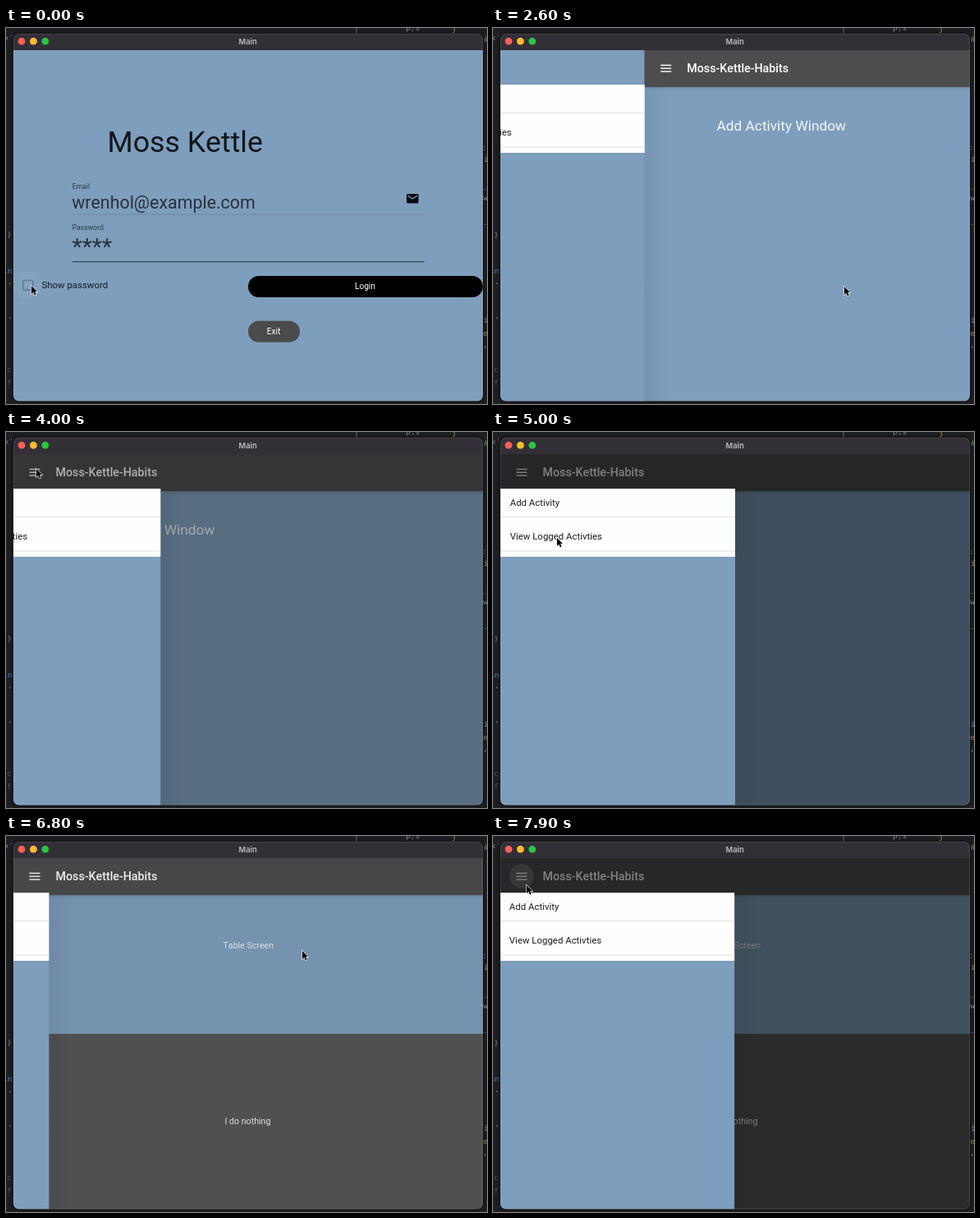
An HTML page with a canvas for the animation above (8 s loop, 586 by 458 pixels).

```html
<!DOCTYPE html>
<html lang="en">
<head>
<meta charset="utf-8">
<title>Main</title>
<style>
html, body { margin: 0; width: 100%; height: 100%; overflow: hidden; background: #1f2023; }
canvas { display: block; }
</style>
</head>
<body>
<canvas id="stage" width="586" height="458"></canvas>
<script>
const ctx = document.getElementById('stage').getContext('2d');
ctx.fontKerning = 'none';
const LOOP = 8000, LEFT = 9, TOP = 27, W = 572, BOTTOM = 454.5, DRAWER = 286;
const BLUE = '#7e9ebd', GREY = '#4d4d4d';
const SANS = 'Roboto, sans-serif', MONO = '"DejaVu Sans Mono", monospace';

const clamp = v => Math.min(1, Math.max(0, v));
const span = (t, from, length) => clamp((t - from) / length);
const outQuad = p => 1 - (1 - p) ** 2;
const outCubic = p => 1 - (1 - p) ** 3;
const inOut = p => p * p * (3 - 2 * p);

function rect(x, y, w, h, color) {
  ctx.fillStyle = color;
  ctx.fillRect(x, y, w, h);
}

function round(x, y, w, h, r) {
  ctx.beginPath();
  ctx.roundRect(x, y, w, h, r);
}

function pill(x, y, w, h, color) {
  round(x, y, w, h, h / 2);
  ctx.fillStyle = color;
  ctx.fill();
}

function disc(x, y, r, color) {
  ctx.beginPath();
  ctx.arc(x, y, Math.max(0, r), 0, 7);
  ctx.fillStyle = color;
  ctx.fill();
}

function text(s, x, y, size, color, weight = 400, family = SANS) {
  ctx.font = `${weight} ${size}px ${family}`;
  ctx.fillStyle = color;
  ctx.fillText(s, x, y);
}

function fade(x0, y0, x1, y1, alpha) {
  const g = ctx.createLinearGradient(x0, y0, x1, y1);
  g.addColorStop(0, `rgba(0,0,0,${alpha})`);
  g.addColorStop(1, 'rgba(0,0,0,0)');
  return g;
}

function clipped(x, y, w, h, r, paint) {
  ctx.save();
  round(x, y, w, h, r);
  ctx.clip();
  paint();
  ctx.restore();
}

function shifted(dx, paint) {
  ctx.save();
  ctx.translate(dx, 0);
  paint();
  ctx.restore();
}

// Slivers of a code editor showing around the window: text, x, y, colour
const slivers = [
  ["ox'", -8, 15, '#777b80'], [')', 1, 255, '#8b8f96'], ['in', -4, 299, '#4f8fd0'],
  ["'", 2, 317, '#a6a6a0'], ["'", 2, 359, '#a6a6a0'], ['c', 1, 419, '#55585c'],
  ['f', 1, 435, '#55585c'], ['#', 582, 17, '#5f8f4e'], [':', 580, 149, '#8aa04a'],
  ['i', 582, 163, '#c09a50'], ['_s', 580, 195, '#a9a95a'], ['w', 581, 210, '#9aa0a6'],
  ['-', 581, 242, '#6a8f4e'], ['i', 582, 359, '#9aa0a6'], ['e', 581, 375, '#c08a50'],
  [',', 581, 389, '#9aa0a6'], ['p,s', 487, 3, '#85898f'], ['j', 543, 4, '#c0a84a']
];

function desktop() {
  rect(0, 0, 586, 458, '#1f2023');
  rect(426, 0, 2, 7, '#4a4b4f');
  for (const [s, x, y, color] of slivers) text(s, x, y, 9.5, color, 400, MONO);
}

function login(t) {
  rect(LEFT, TOP, W, 428, BLUE);
  text('Moss Kettle', 123.5, 151, 35.7, '#11161b');
  text('Email', 80.7, 196, 8.6, '#2c3844');
  text('wrenhol@example.com', 80.2, 220, 21.4, '#28323c');
  rect(81, 226.5, 428, 1, '#6d89a5');
  text('Password', 80.7, 246, 8.6, '#2c3844');
  text('****', 80.5, 276, 28.3, '#28323c');
  rect(81, 284, 428.5, 1.3, '#2f4f5a');

  round(488, 202, 14.5, 11.5, 1.5);
  ctx.fillStyle = '#080a0c';
  ctx.fill();
  ctx.beginPath();
  ctx.moveTo(489.5, 204.2);
  ctx.lineTo(495.2, 208);
  ctx.lineTo(501, 204.2);
  ctx.strokeStyle = BLUE;
  ctx.lineWidth = 1.3;
  ctx.stroke();

  disc(26.5, 313.5, 17, `rgba(255,255,255,${0.04 * (1 - span(t, 50, 250))})`);
  round(20.8, 307.4, 11.8, 11.8, 1.5);
  ctx.strokeStyle = '#61788f';
  ctx.lineWidth = 1.4;
  ctx.stroke();
  text('Show password', 43.4, 317.2, 11.43, '#151b21');

  pill(295, 302, 286, 26, '#000');
  if (t > 880 && t < 1200) clipped(295, 302, 286, 26, 13, () =>
    disc(448, 319, 170 * outQuad(span(t, 880, 180)), `rgba(255,255,255,${0.18 * (1 - span(t, 1050, 150))})`));
  text('Login', 425, 318.2, 10.1, '#fff');
  pill(295, 356.8, 63, 26, '#4b4b4b');
  text('Exit', 317.8, 373.2, 10.1, '#fff');
}

function activityScreen() {
  rect(LEFT, 72, W, 383, BLUE);
  text('Add Activity Window', 96.8, 125.4, 17.3, '#f3f6f9');
}

function tableScreen() {
  rect(LEFT, 72, W, 169, BLUE);
  rect(LEFT, 241, W, 214, '#565656');
  text('Table Screen', 264.5, 137, 10.65, '#f0f3f6');
  text('I do nothing', 266.5, 351, 10.65, '#f3f3f3');
}

function iconRipple(t, start, end) {
  if (t < start || t > end) return;
  const alpha = 0.18 * (1 - span(t, end - 250, 250));
  disc(35, 49, 14.8 * outQuad(span(t, start, 150)), `rgba(255,255,255,${alpha})`);
}

function toolbar(t) {
  rect(LEFT, 72, W, 4, fade(0, 72, 0, 76, 0.12));
  rect(LEFT, TOP, W, 45, GREY);
  iconRipple(t, 3990, 4450);
  iconRipple(t, 7690, 8300);
  for (const y of [44.7, 48.5, 52.3]) rect(28.5, y, 13, 1.4, '#fff');
  text('Moss-Kettle-Habits', 60.5, 54.2, 14.28, '#fff', 500);
}

function openness(t) {
  if (t >= 7730) return outCubic(span(t, 7730, 200));
  if (t >= 6672) return 1 - Math.sin(span(t, 6672, 200) * Math.PI / 2);
  return outCubic(span(t, 3945, 200));
}

function drawer(t) {
  rect(LEFT, 69, DRAWER, 386, BLUE);
  rect(LEFT, 69, DRAWER, 83, '#fefefe');
  rect(LEFT, 103, DRAWER, 1, '#e2e2e2');
  rect(LEFT, 144.5, DRAWER, 1, '#e2e2e2');
  text('Add Activity', 20.7, 90, 11.43, '#1c1c1c');
  text('View Logged Activties', 20.7, 131.3, 11.43, '#1c1c1c');
  if (t > 5580 && t < 6250) clipped(LEFT, 111, DRAWER, 34, 0, () =>
    disc(78, 129, 230 * outQuad(span(t, 5580, 320)), `rgba(182,182,182,${0.33 * (1 - span(t, 6030, 200))})`));
}

function home(t) {
  const swap = outQuad(span(t, 5560, 400)), open = openness(t);
  if (swap < 1) shifted(-W * swap, activityScreen);
  if (swap > 0) shifted(W * (1 - swap), tableScreen);
  toolbar(t);
  rect(LEFT, TOP, W, 428, `rgba(0,0,0,${0.5 * open})`);
  const edge = LEFT + DRAWER * open;
  if (open > 0 || t < 2900) rect(edge, 72, 30, 383, fade(edge, 0, edge + 30, 0, 0.06));
  shifted(DRAWER * (open - 1), () => drawer(t));
}

function frame(t) {
  const slide = outQuad(span(t, 2391.5, 470));
  ctx.save();
  ctx.shadowColor = 'rgba(0,0,0,.6)';
  ctx.shadowBlur = 8;
  round(LEFT, 7, W, 447.5, 7);
  ctx.fillStyle = '#332f37';
  ctx.fill();
  ctx.restore();
  clipped(LEFT, 7, W, 447.5, 7, () => {
    rect(LEFT, 7, W, 20, '#332f37');
    ctx.beginPath();
    ctx.rect(LEFT, TOP, W, BOTTOM - TOP);
    ctx.clip();
    if (slide < 1) shifted(-W * slide, () => login(t));
    if (slide > 0) shifted(W * (1 - slide), () => home(t));
  });
  round(LEFT + 0.5, 7.5, W - 1, 446.5, 7);
  ctx.strokeStyle = 'rgba(255,255,255,.1)';
  ctx.lineWidth = 1;
  ctx.stroke();
  ['#ff5f57', '#febc2e', '#28c840'].forEach((c, i) => disc(19 + 14.4 * i, 16.2, 4.4, c));
  text('Main', 283.5, 19.6, 9.4, '#c0bcc3', 600, 'Inter, sans-serif');
}

// Pointer stops: time, x, y
const stops = [
  [50, 31, 314], [500, 448, 319], [2080, 448, 319], [2200, 428, 315], [2750, 428, 315],
  [3750, 37, 45], [4250, 37, 45], [4950, 78, 129], [6020, 78, 129], [6200, 353, 139],
  [6380, 353, 139], [6500, 361, 140], [6880, 361, 140], [7500, 41, 60], [LOOP, 41, 60]
];

function pointer(t) {
  const i = Math.max(1, stops.findIndex(s => s[0] >= t));
  const [t0, x0, y0] = stops[i - 1], [t1, x1, y1] = stops[i];
  const p = inOut(span(t, t0, t1 - t0));
  ctx.save();
  ctx.translate(x0 + (x1 - x0) * p, y0 + (y1 - y0) * p);
  const arrow = new Path2D('M0 0V9.9L2.3 7.8L3.9 11.4L5.6 10.6L4.1 7.1H7Z');
  ctx.strokeStyle = '#fff';
  ctx.lineWidth = 1.2;
  ctx.stroke(arrow);
  ctx.fillStyle = '#000';
  ctx.fill(arrow);
  ctx.restore();
}

function draw(now) {
  const t = now % LOOP;
  desktop();
  frame(t);
  pointer(t);
  requestAnimationFrame(draw);
}
requestAnimationFrame(draw);
</script>
</body>
</html>
```
